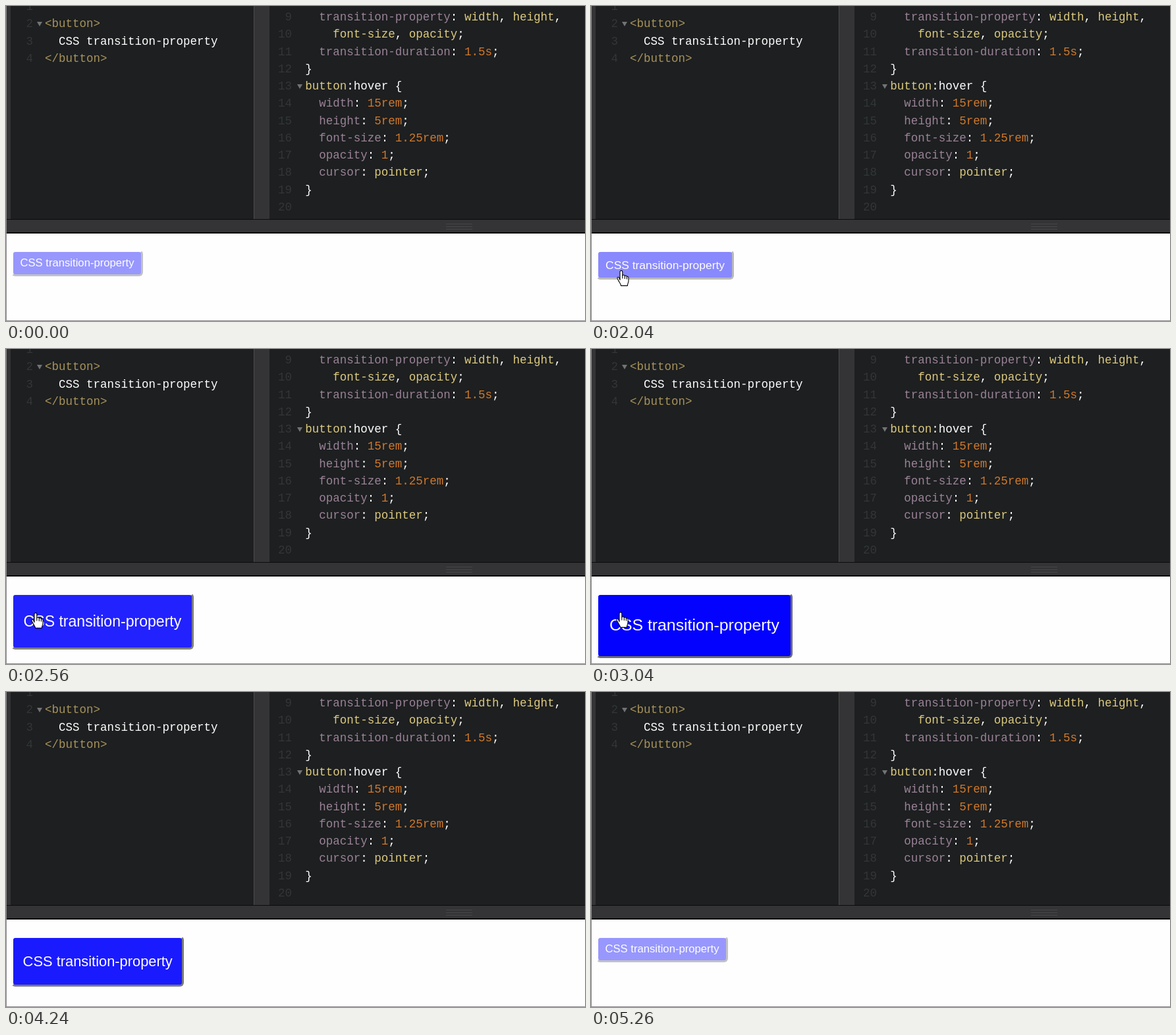
These frames come from a looping animation (879x479 px, 5.87 s). An HTML page:

```html
<!DOCTYPE html>
<html lang="en">
<head>
<meta charset="utf-8">
<title>CSS transition-property</title>
<style>
  html, body { margin: 0; width: 100%; height: 100%; overflow: hidden; background: #fefefe; }
  #stage { position: absolute; left: 0; top: 0; width: 879px; height: 479px; overflow: hidden; }
  #stage div, #stage svg { position: absolute; box-sizing: border-box; }

  .editors { left: 0; top: 0; width: 879px; height: 324px; background: #343436; }
  .pane { top: 0; height: 324px; background: #1d1f20; overflow: hidden; }
  .html { left: 7px; width: 369px; }
  .css { left: 400px; width: 479px; }
  .edge { left: 376px; top: 0; width: 1px; height: 324px; background: #4b4b4e; }

  .row { white-space: pre; color: #fff; height: 26.25px;
         font: 17.5px/26.25px "Liberation Mono", "Courier New", monospace; }
  .num { left: 0; width: 34px; text-align: right; color: #333637; }
  .fold { width: 0; height: 0; border: solid transparent; border-width: 7px 4px 0; border-top-color: #717374; }
  .t { color: #a7925a; }
  .p { color: #9a8297; }
  .n { color: #d0782a; }
  .y { color: #ddca7e; }

  .bar { left: 0; top: 324px; width: 879px; height: 22px; background: #343436;
         border-top: 1px solid #0c0c0c; border-bottom: 2px solid #0c0c0c; }
  .grip { left: 668px; width: 40px; height: 1px; background: #464648; }
  .left { left: 0; top: 0; width: 1px; height: 479px; background: #8c8a8c; }
  .bottom { left: 0; top: 478px; width: 879px; height: 1px; background: #8c8a8c; }

  #button { left: 8px; top: 371px; display: flex; align-items: center; justify-content: center;
            background: #00f; color: #fff; white-space: nowrap; border: 3px solid;
            border-color: #fcfcfc #6b6b6b #6b6b6b #fcfcfc; border-radius: 6px;
            font-family: "Liberation Sans", Arial, sans-serif; line-height: 1.15; }
  #cursor { left: 0; top: 0; width: 30px; height: 30px; overflow: visible; }
  #cursor path { fill: #fff; stroke: #000; stroke-width: 1.1; stroke-linejoin: round; stroke-linecap: round; }
</style>
</head>
<body>
<div id="stage">
  <div class="editors">
    <div class="pane html" id="html"></div>
    <div class="edge"></div>
    <div class="pane css" id="css"></div>
  </div>
  <div class="bar"></div>
  <div class="grip" style="top:331px"></div>
  <div class="grip" style="top:335px"></div>
  <div class="grip" style="top:339px"></div>
  <div class="left"></div>
  <div class="bottom"></div>
  <div id="button">CSS transition-property</div>
  <svg id="cursor">
    <path id="arrow" d="M.5 .5V16.5L4.3 13 6.8 18.6 9.3 17.5 6.9 12H11.8Z"/>
    <g id="hand">
      <path d="M-2 14.5V2.2C-2-.3 1.8-.3 1.8 2.2V8C2.4 6.4 5.2 6.7 5.3 8.8C5.9 7.4 8.3 7.8 8.4 9.8C9.2 8.8 11 9.4 11 11.4V16C11 18.6 9.6 19.6 9.3 23.4H-.4C-.6 20.6-3 18.4-4.2 15.8L-6 12.2C-6.6 10.4-4.4 9.6-3.4 11.2Z"/>
      <path d="M1.8 8V12M5.3 8.8V12.4M8.4 9.8V13"/>
    </g>
  </svg>
</div>
<script>
const LOOP = 5870;
const $ = id => document.getElementById(id);

// Markup shorthand: {t text} becomes a coloured span of class t.
const paint = s => s.replace(/</g, '&lt;').replace(/\{([tpny]) ([^}]*)\}/g, '<span class="$1">$2</span>');

function fillPane(id, lines, first, top, textLeft, foldLine) {
  lines.forEach((line, i) => {
    const y = top + i * 26.25;
    let row = `<div class="row num" style="top:${y}px">${first + i}</div>` +
              `<div class="row" style="top:${y}px;left:${textLeft}px">${paint(line)}</div>`;
    if (first + i === foldLine)
      row += `<div class="fold" style="left:${textLeft - 12}px;top:${y + 10}px"></div>`;
    $(id).insertAdjacentHTML('beforeend', row);
  });
}

fillPane('html', ['', '{t <button>}', '  CSS transition-property', '{t </button>}'], 1, -12, 52, 2);
fillPane('css', [
  '  {p transition-property}: {y width}, {y height},',
  '    {y font-size}, {y opacity};',
  '  {p transition-duration}: {n 1.5s};',
  '}',
  '{y button}:hover {',
  '  {p width}: {n 15rem};',
  '  {p height}: {n 5rem};',
  '  {p font-size}: {n 1.25rem};',
  '  {p opacity}: {n 1};',
  '  {p cursor}: {y pointer};',
  '}',
  ''
], 9, 4.2, 54.3, 13);

// The picture advances in runs of 120 ms steps: [start, steps].
const runs = [[0, 1], [1080, 9], [2170, 1], [2320, 19], [4620, 4], [5130, 1], [5260, 1]];
function snap(t) {
  const [start, steps] = runs.findLast(r => r[0] <= t);
  return start + Math.min(steps - 1, Math.floor((t - start) / 120)) * 120;
}

// cubic-bezier(.25, .1, .25, 1)
function ease(x) {
  if (x <= 0) return 0;
  if (x >= 1) return 1;
  let lo = 0, hi = 1, u;
  const curve = (a, b) => 3 * a * u * (1 - u) ** 2 + 3 * b * u * u * (1 - u) + u ** 3;
  for (let i = 0; i < 24; i++) {
    u = (lo + hi) / 2;
    if (curve(.25, .25) < x) lo = u; else hi = u;
  }
  return curve(.1, 1);
}

const GROW = 1904, LEAVE = 4000, SPAN = 1400;
const FADE_LAG = .09;  // the fade back trails the shrinking a little

function hoverAmount(t, lag = 0) {
  if (t <= LEAVE) return ease((t - GROW) / SPAN);
  if (t >= 5260) return 0;
  const x = t < 4480 ? (t - LEAVE) / 1020 : .47 + (t - 4480) / SPAN;
  return 1 - ease(x - lag);
}

// Pointer tip: [time, x, y]
const path = [
  [1080, 326, 472], [1560, 116, 437], [1680, 85, 424], [1800, 65, 412], [1920, 52, 405],
  [2040, 46, 402], [2170, 45, 401], [2560, 45, 401], [2680, 45, 400], [3160, 45, 400],
  [3280, 48, 400], [3400, 60, 402], [3520, 75, 406], [3640, 110, 415], [3760, 190, 430],
  [3880, 285, 447], [4000, 445, 466], [4120, 648, 476]
];
function pointer(t) {
  const i = path.findIndex(k => k[0] >= t);
  if (i < 0 || t < path[0][0]) return null;
  const b = path[i], a = path[Math.max(0, i - 1)];
  const f = b === a ? 0 : (t - a[0]) / (b[0] - a[0]);
  return [1, 2].map(k => Math.round(a[k] + (b[k] - a[k]) * f));
}

function draw(now) {
  const t = snap(now % LOOP);
  const p = hoverAmount(t);
  const mix = (a, b, k = p) => a + (b - a) * k;
  Object.assign($('button').style, {
    width: mix(200, 300) + 'px',
    height: mix(40, 100) + 'px',
    fontSize: mix(16.667, 25) + 'px',
    opacity: mix(.4, 1, hoverAmount(t, FADE_LAG))
  });

  const at = pointer(t);
  $('cursor').style.display = at ? '' : 'none';
  if (at) {
    const over = t >= GROW && t < LEAVE;
    $('cursor').style.transform = `translate(${at[0]}px, ${at[1]}px)`;
    $('hand').style.display = over ? '' : 'none';
    $('arrow').style.display = over ? 'none' : '';
  }
}

const begin = performance.now();
function tick() {
  draw(performance.now() - begin);
  requestAnimationFrame(tick);
}
tick();
</script>
</body>
</html>
```
